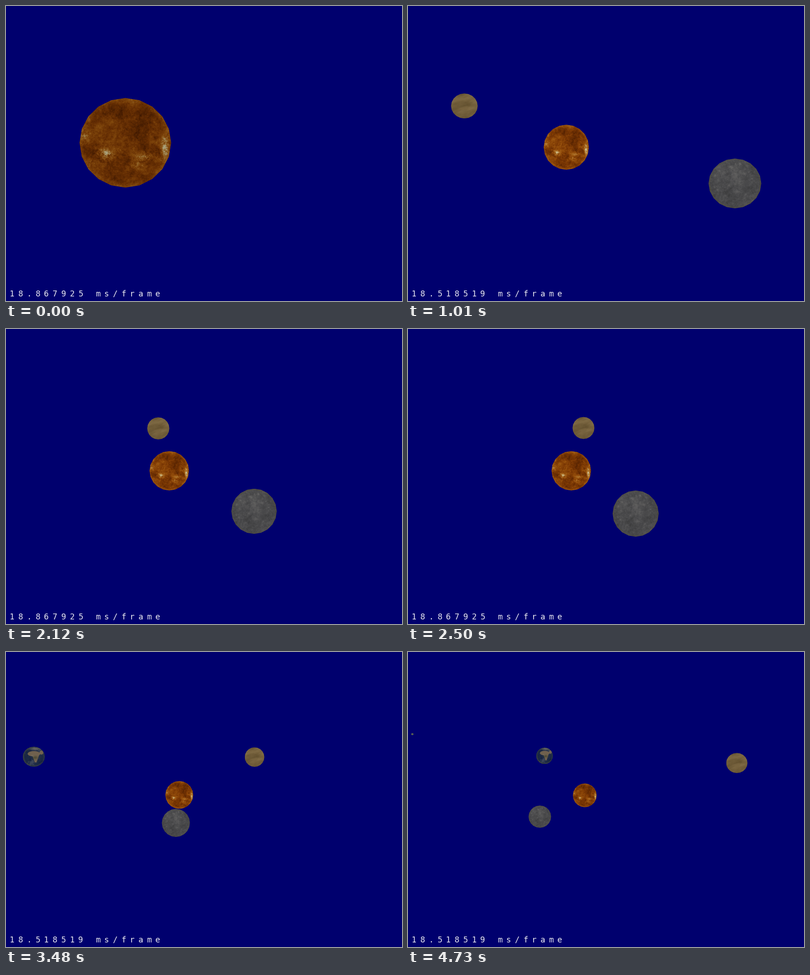
A matplotlib script that plays this animation: 867x646 px, repeating every 4800 ms.

```python
import numpy as np
import matplotlib.pyplot as plt
from matplotlib.animation import FuncAnimation
from matplotlib.path import Path
from matplotlib.transforms import Affine2D

W, H, DPI = 867, 646, 100
LOOP, INTERVAL = 4800, 20
FOCAL, VIEW_X, VIEW_Y = 780, 432, 319
SUN_X, SUN_Y = -1.728, -0.197      # sun offset from the view axis, in sun radii
SIZE, SIDES = 220, 20

rng = np.random.default_rng(11)
X, Y = np.meshgrid(np.linspace(-1, 1, SIZE), np.linspace(-1, 1, SIZE))
R = np.hypot(X, Y)


# ---- surfaces -------------------------------------------------------------
def noise(power, stretch=1.0, tilt=0.0):
    f = np.fft.fftfreq(SIZE) * SIZE
    fx, fy = np.meshgrid(f, f)
    u = (fx * np.cos(tilt) + fy * np.sin(tilt)) * stretch
    v = fy * np.cos(tilt) - fx * np.sin(tilt)
    k = np.maximum(np.hypot(u, v), 1.5)
    spec = np.fft.fft2(rng.normal(size=(SIZE, SIZE))) / k ** power
    field = np.fft.ifft2(spec).real
    return (field - field.mean()) / field.std()


def blob(x, y, w, h):
    return np.exp(-((X - x) / w) ** 2 - ((Y - y) / h) ** 2)


def ramp(v, stops, colors):
    c = np.array(colors) / 255
    return np.dstack([np.interp(v, stops, c[:, i]) for i in range(3)])


def mix(base, color, amount):
    return base + (np.array(color) / 255 - base) * np.clip(amount, 0, 1)[..., None]


def sun_surface():
    fine = noise(0.9)
    v = 0.36 + 0.08 * noise(1.2) + 0.05 * fine
    v -= 0.16 * blob(0.02, -0.15, 0.2, 0.25) + 0.1 * blob(-0.2, -0.7, 0.5, 0.15)
    v -= 0.12 * blob(0.06, 0.36, 0.16, 0.12)
    spots = (blob(-0.43, 0.26, 0.2, 0.14) + blob(0.86, 0.1, 0.08, 0.22)
             + 0.7 * blob(0.44, 0.31, 0.17, 0.1) + 0.45 * blob(0.3, 0.5, 0.2, 0.08)
             + 0.4 * blob(-0.88, -0.13, 0.13, 0.14) + 0.4 * blob(-0.74, 0.46, 0.12, 0.08))
    v += spots * (0.55 + 0.17 * fine)
    v += 0.16 * np.clip((R - 0.88) / 0.12, 0, 1)
    return ramp(v, [0, 0.35, 0.58, 0.78, 1],
                [(66, 24, 0), (124, 56, 4), (156, 86, 14), (182, 130, 58), (206, 196, 150)])


def mercury_surface():
    v = 0.45 + 0.07 * noise(1.1) + 0.04 * noise(0.6)
    for _ in range(26):
        x, y = rng.uniform(-0.8, 0.8, 2)
        size = rng.uniform(0.025, 0.06)
        v += rng.uniform(0.08, 0.25) * blob(x, y, size, size)
    v += 0.15 * blob(0.1, -0.4, 0.25, 0.2)
    base = ramp(v, [0, 0.45, 1], [(46, 46, 46), (74, 74, 76), (124, 122, 118)])
    return mix(base, (88, 80, 50), (R - 0.92) * 5)


def venus_surface():
    v = 0.5 + 0.1 * noise(1.7, 3.5, -0.35)
    v -= 0.2 * blob(0.1, -0.1, 0.7, 0.2)
    v += 0.2 * blob(-0.1, 0.5, 0.5, 0.2)
    return ramp(v, [0, 0.5, 1], [(82, 66, 36), (116, 96, 60), (146, 124, 84)])


def earth_surface():
    v = 0.5 + 0.2 * noise(1.3)
    base = ramp(v, [0, 1], [(18, 32, 62), (40, 52, 76)])
    north = ((X + 0.02) / 0.56) ** 2 + ((Y + 0.28) / 0.27) ** 2 < 1
    south = (np.abs(X - 0.14) < 0.3 - 0.33 * (Y + 0.1)) & (Y > -0.3) & (Y < 0.58)
    arabia = ((X - 0.66) / 0.17) ** 2 + ((Y + 0.4) / 0.2) ** 2 < 1
    base = mix(base, (122, 104, 80), (north | south | arabia) * 0.9)
    base = mix(base, (62, 66, 42), 0.7 * blob(0.1, 0.1, 0.24, 0.16))
    base = mix(base, (112, 108, 100), 0.9 * blob(0.1, -0.78, 0.5, 0.14))
    base = mix(base, (140, 140, 138), 0.25 * (noise(1.3) > 1.1))
    return mix(base, (74, 78, 56), (R - 0.85) * 4)


# ---- stage ----------------------------------------------------------------
fig = plt.figure(figsize=(W / DPI, H / DPI), dpi=DPI, facecolor="#00006e")
ax = fig.add_axes([0, 0, 1, 1])
ax.axis("off")
ax.set_autoscale_on(False)
ax.set_xlim(0, W)
ax.set_ylim(H, 0)

corners = 2 * np.pi * np.arange(SIDES + 1) / SIDES
OUTLINE = Path(np.column_stack([np.cos(corners), np.sin(corners)]), closed=True)


class Ball:
    def __init__(self, surface, radius, zorder):
        self.surface, self.radius = surface, radius
        self.place = Affine2D()
        to_screen = self.place + ax.transData
        self.image = ax.imshow(np.clip(surface, 0, 1), extent=(-1, 1, 1, -1), aspect="auto",
                               transform=to_screen, zorder=zorder)
        self.image.set_clip_path(OUTLINE, to_screen)

    def put(self, cx, cy, rx, ry):
        self.place.clear().scale(rx, ry).translate(cx, cy)
        self.image.set_visible(cx + rx > 0 and cx - rx < W)

    def project(self, x, y, z):
        """Perspective image of a sphere: an ellipse stretched away from the axis."""
        q = z * z - self.radius ** 2
        if z < 3 * self.radius:
            self.image.set_visible(False)
            return
        r = FOCAL * self.radius / np.sqrt(q)
        self.put(VIEW_X + FOCAL * x * z / q, VIEW_Y + FOCAL * y * z / q,
                 r * np.sqrt(1 + x * x / q), r * np.sqrt(1 + y * y / q))


earth = Ball(earth_surface(), 1.6, 1)
venus = Ball(venus_surface(), 1.5, 2)
sun = Ball(sun_surface(), 1.0, 3)
mercury = Ball(mercury_surface(), 0.714, 4)
moon = Ball(np.full((8, 8, 3), (0.33, 0.36, 0.33)), 1.0, 1)
ax.set_xlim(0, W)
ax.set_ylim(H, 0)

letters = [ax.text(13.6 + 18.75 * i, 635.5, "", family="DejaVu Sans Mono", size=12.6,
                   color="#e8e8f0", ha="center", va="baseline", zorder=9)
           for i in range(18)]

# ---- motion ---------------------------------------------------------------
BURSTS = [(230, 700, 7), (770, 1240, 7), (1320, 1800, 7), (1880, 2350, 7), (2430, 2930, 7),
          (2990, 3480, 7), (3550, 4010, 7), (4100, 4570, 7), (4650, 4730, 2)]
STEPS = np.concatenate([[0]] + [np.linspace(*b) for b in BURSTS])
READINGS = [(0, 53), (540, 54), (1560, 53), (2560, 54), (3555, 56), (4560, 54)]


def sun_depth(t):
    return np.interp(t, [150, 630, 1240, 2672, 3950], [8.02, 12.19, 18.14, 18.14, 30])


def venus_angle(t):
    return np.interp(t, [0, 630, 1480, 2120, 2930, 4010, 4730],
                     [-45.7, -34.4, -19.1, -7.6, 6.5, 27.1, 40.5])


def orbit(ball, depth, angle, wide, deep, rise, lean=0.0):
    s, c = np.sin(np.radians(angle)), np.cos(np.radians(angle))
    ball.project(SUN_X + wide * s, SUN_Y - rise * c - lean * s, depth + deep * c)


def draw(i):
    now = i * INTERVAL + INTERVAL / 2
    t = STEPS[STEPS <= now][-1]
    depth = sun_depth(t)

    sun.project(SUN_X, SUN_Y, depth)
    sun.image.set_data(np.clip(sun.surface * np.interp(depth, [8, 12.2], [0.82, 1]), 0, 1))
    orbit(mercury, depth, 34.1 - 0.0159 * (t - 1480), 8.2, -7.45, -1.485)
    orbit(venus, depth, venus_angle(t), 33, 30.8, 6.23, 0.4)
    orbit(earth, depth, -28.5 + 0.0196 * (t - 4010), 40.6, 40.6, 8.2)
    moon.put(9.5 - 0.031 * (4730 - t), 180, 2.6, 2.4)

    fps = [n for start, n in READINGS if start <= t][-1]
    for letter, char in zip(letters, f"{1000 / fps:.6f} ms/frame"):
        letter.set_text(char)
    return []


anim = FuncAnimation(fig, draw, frames=LOOP // INTERVAL, interval=INTERVAL,
                     repeat=True, repeat_delay=0, blit=False)
plt.show()
```
